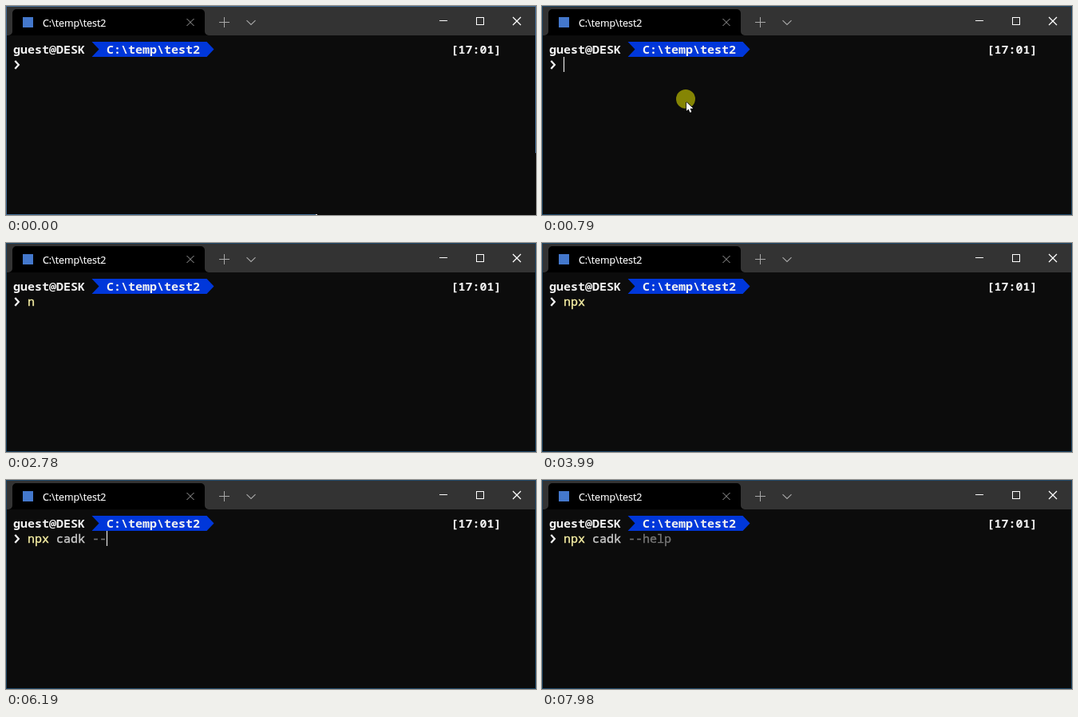
An HTML page with a canvas for the animation above (8 s loop, 664 px wide and 263 px high).

```html
<!DOCTYPE html>
<html lang="en">
<head>
<meta charset="utf-8">
<title>Terminal</title>
<style>
  html, body { margin: 0; width: 100%; height: 100%; overflow: hidden; background: #0c0c0c; }
  canvas { display: block; }
</style>
</head>
<body>
<canvas id="stage" width="664" height="263"></canvas>
<script>
const ctx = document.getElementById('stage').getContext('2d');
const W = 664, H = 263, LOOP = 8000, TICK = 200;
const CELL = 9, LEFT = 9, ROW = 19, TOP = 45;
const MONO = '15px "Noto Sans Mono", "DejaVu Sans Mono", monospace';
const UI = '12.4px "Open Sans", sans-serif';

// One comma is one tick of typing, beginning at FIRST_KEY.
const FIRST_KEY = 11;
const RHYTHM = 'n,,,,p,x ,,,,,c,,a,,d,,,k, ,,--,,,h,e,l,p'.split(',');
const caretOff = [[0, 4], [7, 10], [14, 16], [20, 21], [40, 41]];

const column = n => LEFT + n * CELL;

function rect(x, y, w, h, color) {
  ctx.fillStyle = color;
  ctx.fillRect(x, y, w, h);
}

function text(str, x, y, color, font, weight = 0) {
  ctx.font = font;
  ctx.fillStyle = ctx.strokeStyle = color;
  ctx.fillText(str, x, y);
  if (weight) {
    ctx.lineWidth = weight;
    ctx.strokeText(str, x, y);
  }
}

function trace(points) {
  ctx.beginPath();
  points.forEach(([x, y]) => ctx.lineTo(x, y));
}

function polygon(points, color) {
  trace(points);
  ctx.fillStyle = color;
  ctx.fill();
}

function line(points, color, width = 1) {
  trace(points);
  ctx.strokeStyle = color;
  ctx.lineWidth = width;
  ctx.stroke();
}

function chevron(x, y, dx, dy, color, width) {
  const [px, py] = dx > dy ? [dx, -dy] : [-dx, dy];
  line([[x + (dx > dy ? -px : px), y + (dx > dy ? py : -py)], [x, y], [x + px, y + py]], color, width);
}

function cross(x, y, r, color, width) {
  line([[x - r, y - r], [x + r, y + r]], color, width);
  line([[x - r, y + r], [x + r, y - r]], color, width);
}

function drawTab(left, right, top, bottom, r) {
  ctx.beginPath();
  ctx.moveTo(left - r, bottom);
  ctx.arcTo(left, bottom, left, top, r);
  ctx.arcTo(left, top, right, top, r);
  ctx.arcTo(right, top, right, bottom, r);
  ctx.arcTo(right, bottom, right + r, bottom, r);
  ctx.lineTo(right + r, bottom);
  ctx.fillStyle = '#000';
  ctx.fill();
}

function drawBorder(active) {
  ctx.lineWidth = 1;
  ctx.strokeStyle = active ? '#1f4767' : '#456f98';
  ctx.strokeRect(0.5, 0.5, W - 1, H - 1);
  if (active) return;
  rect(W - 1, 185, 1, H - 185, '#0c0c0c');
  rect(388, H - 1, W - 388, 1, '#0c0c0c');
  rect(388, H - 1, 2, 1, '#ddd');
}

function drawWindow(active) {
  rect(0, 0, W, H, '#0c0c0c');
  rect(0, 0, W, 37, '#333');
  drawTab(8, 249, 4, 37, 5);
  rect(21, 14, 13, 13, '#4478cc');
  text('C:\\temp\\test2', 46, 26, '#fff', UI, 0.2);
  cross(231, 20.5, 4.5, '#a0a0a0');

  line([[267, 20.5], [280, 20.5]], '#a8a8a8');
  line([[273.5, 14], [273.5, 27]], '#a8a8a8');
  chevron(307, 23.5, 5.5, 5.4, '#a8a8a8', 1.1);

  rect(543, 18, 10, 1, '#fff');
  ctx.strokeStyle = '#fff';
  ctx.lineWidth = 1;
  ctx.strokeRect(589.5, 14.5, 9, 9);
  cross(640, 19, 5, '#fff', 1.2);
  drawBorder(active);
}

function drawPrompt() {
  const baseline = TOP + 15, white = '#f2f2f2', bold = '600 ' + MONO;
  const start = column(11) - 0.5, end = column(27) - 0.5;
  const middle = TOP + ROW / 2, bottom = TOP + ROW;
  text('guest@DESK', LEFT, baseline, white, bold);
  polygon([[start, TOP], [end, TOP], [end + CELL, middle],
           [end, bottom], [start, bottom], [start + CELL, middle]], '#0037da');
  text('C:\\temp\\test2', column(13), baseline, white, bold);
  text('[17:01]', column(61) - 0.5, baseline, white, bold);
  chevron(15.8, 74, 4.5, 5, white, 2.3);
}

function drawInput(tick) {
  const typed = RHYTHM.slice(0, Math.max(0, tick - FIRST_KEY + 1)).join('');
  const colors = ['#f9f1a5', '#cccccc', '#767676'];
  let x = column(2);
  typed.split(' ').forEach((word, i) => {
    text(word, x, TOP + ROW + 15, colors[i], MONO, 0.4);
    x += (word.length + 1) * CELL;
  });
  const hidden = caretOff.some(([from, to]) => tick >= from && tick < to);
  if (!hidden) rect(column(2 + typed.length), TOP + ROW, 1, ROW, '#fff');
}

function drawPointer(tick) {
  if (tick < 2 || tick >= 10) return;
  if (tick === 4) {
    ctx.fillStyle = '#858504';
    ctx.beginPath();
    ctx.arc(180, 117, 12, 0, Math.PI * 2);
    ctx.fill();
  }
  const [x, y] = tick < 3 ? [202, 133] : [181, 121];
  const arrow = [[0, 0], [0, 11], [2.5, 8.7], [4.4, 13], [6.4, 12.2], [4.6, 8], [8.4, 8], [0, 0]]
    .map(([dx, dy]) => [x + dx, y + dy]);
  line(arrow, '#000', 1.4);
  polygon(arrow, '#fff');
}

function frame() {
  const tick = Math.floor((performance.now() % LOOP + 20) / TICK);
  drawWindow(tick >= 4);
  drawPrompt();
  drawInput(tick);
  drawPointer(tick);
  requestAnimationFrame(frame);
}

frame();
</script>
</body>
</html>
```
